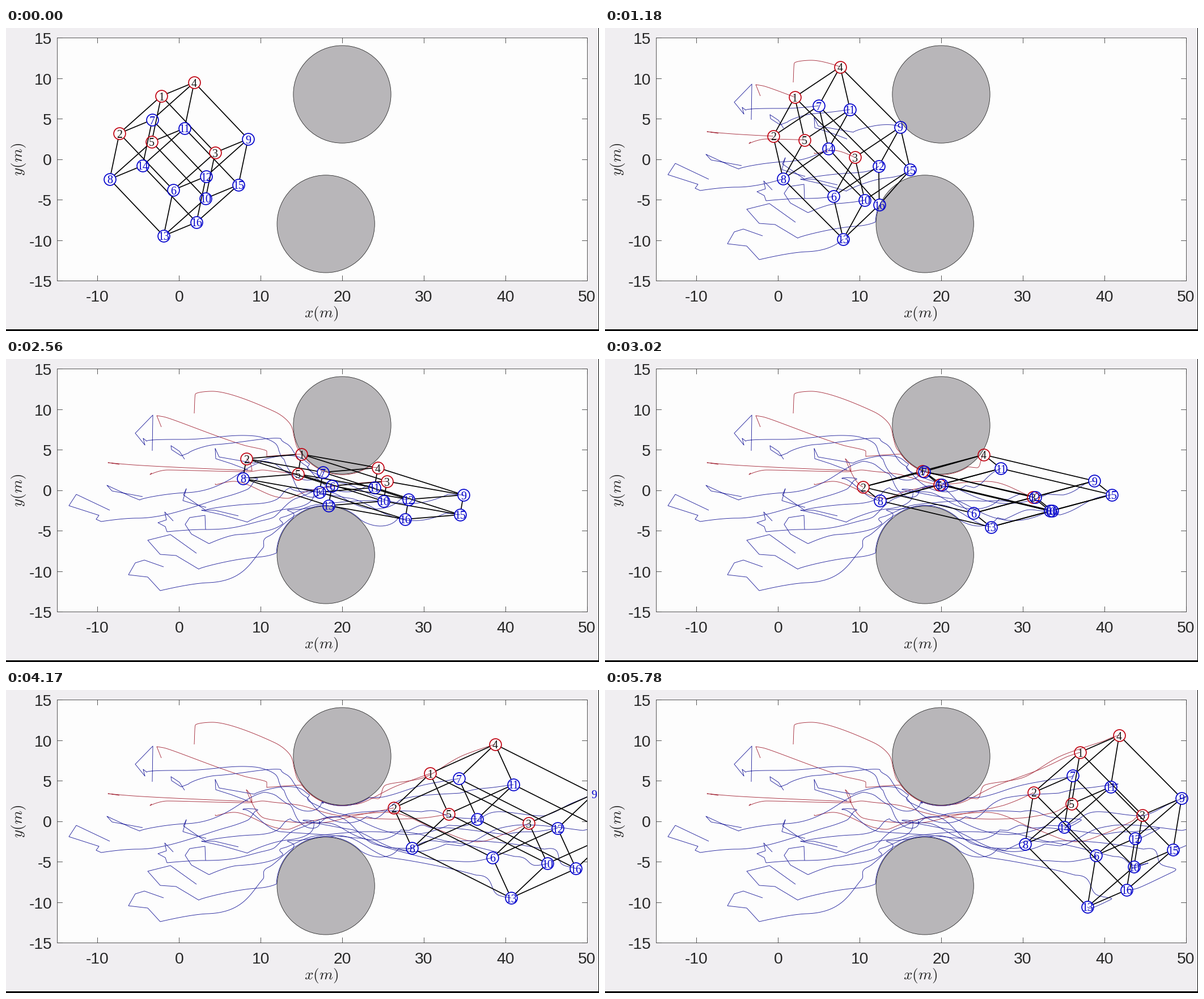
Write a matplotlib script that moves like this. It is 1046x535 px and loops after 5.95 s.

```python
from itertools import combinations

import matplotlib.pyplot as plt
import numpy as np
from matplotlib.animation import FuncAnimation
from matplotlib.collections import LineCollection
from matplotlib.patches import Circle, Rectangle

W, H, DPI = 1046, 535, 100
PT = 72 / DPI                      # points per pixel
LEFT, RIGHT, TOP, BOTTOM = 89.5, 1024.5, 17, 446
TICK_MS, LOOP_MS, FIRST_MS, STEP_MS = 25, 5950, 30, 230
LAST, SUB = 26, 20                 # picture steps, path samples per step
LOCK = 2                           # step at which followers join the formation
RADIUS, CLEARANCE = 10.4, 87.2
RED, BLUE = "#c0000f", "#0000cc"
RED_TRAIL, BLUE_TRAIL = "#a52a3a", "#22229c"

# Way points of the five leaders at shared steps
STEPS = np.array([0, 2, 4, 8, 9, 10, 12, 14, 16, 18, 19.5, 22, 26])
LEADERS = [
    [(274, 120), (266, 100), (278, 102), (419, 152), (460, 163), (460, 172),
     (521, 168), (560, 197), (613, 202), (690, 169), (770, 139), (817, 117),
     (838, 110)],
    [(200, 186), (180, 183), (225, 187), (384, 195), (434, 197), (432, 187),
     (424, 176), (455, 226), (545, 235), (625, 220), (705, 203), (744, 187),
     (756, 181)],
    [(369, 220), (370, 222), (402, 216), (480, 244), (497, 246), (540, 231),
     (672, 216), (755, 244), (830, 268), (885, 252), (932, 230), (936, 226),
     (948, 221)],
    [(332, 96), (334, 62), (364, 57), (474, 93), (502, 116), (517, 161),
     (656, 192), (668, 169), (733, 156), (805, 116), (880, 90), (896, 83),
     (907, 80)],
    [(257, 201), (254, 204), (285, 196), (427, 199), (452, 196), (470, 198),
     (515, 203), (590, 222), (681, 228), (735, 226), (795, 215), (811, 206),
     (823, 201)],
]

# Followers wander through these points before they lock on
WANDER = [
    [(280, 270), (283, 284), (268, 289), (281, 296)],
    [(259, 99), (228, 131), (245, 152), (242, 140)],
    [(124, 239), (111, 259), (164, 276), (159, 283)],
    [(398, 185), (370, 176), (369, 158), (376, 173)],
    [(351, 276), (324, 280), (316, 292), (327, 309)],
    [(306, 163), (291, 153), (292, 160), (309, 171)],
    [(335, 257), (312, 250), (318, 229), (313, 240)],
    [(244, 355), (228, 360), (216, 381), (250, 385)],
    [(187, 233), (178, 223), (221, 243)],
    [(368, 267), (345, 267), (381, 275)],
    [(290, 310), (250, 320), (272, 345), (300, 347)],
]


def px(x):
    return LEFT + (x + 15) * (RIGHT - LEFT) / 65


def py(y):
    return TOP + (15 - y) * (BOTTOM - TOP) / 30


OBSTACLES = [(px(20), py(8)), (px(18), py(-8))]


def smooth(t, k, v):
    """Monotone cubic through the points (k, v)."""
    h = np.diff(k)[:, None]
    d = np.diff(v, axis=0) / h
    m = np.vstack([d[:1], np.zeros_like(d[1:]), d[-1:]])
    prod, total = d[:-1] * d[1:], d[:-1] + d[1:]
    m[1:-1] = np.where(prod > 0, 2 * prod / np.where(prod > 0, total, 1), 0)
    i = np.clip(np.searchsorted(k, t, "right") - 1, 0, len(h) - 1)
    u = (t - k[i])[:, None] / h[i]
    return (v[i] * (1 + 2 * u) * (1 - u) ** 2 + v[i + 1] * u * u * (3 - 2 * u)
            + h[i] * u * (1 - u) * (m[i] * (1 - u) - m[i + 1] * u))


def keep_out(path):
    """Slide a path around the obstacles it would cut through."""
    for centre in OBSTACLES:
        off = path - centre
        dist = np.maximum(np.hypot(*off.T), 1)[:, None]
        path = centre + off * np.maximum(1, CLEARANCE / dist)
    return path


def build_paths(groups):
    t = np.arange(LAST * SUB + 1) / SUB
    lead = [keep_out(smooth(t, STEPS, np.array(p, float))) for p in LEADERS]
    paths = [keep_out(sum((lead[g] for g in group),
                          (1 - len(group)) * lead[0])) for group in groups]
    early = t < LOCK
    for path, points in zip(paths[5:], WANDER):
        points = np.vstack([path[0], points, path[LOCK * SUB]])
        k = np.linspace(0, LOCK, len(points))
        for c in (0, 1):
            path[early, c] = np.interp(t[early], k, points[:, c])
    return np.array(paths)


# The formation is a projected hypercube spanned by leaders 2 to 5
groups = [g for n in range(5) for g in combinations(range(1, 5), n)]
edges = np.array([(i, j) for i, a in enumerate(groups)
                  for j, b in enumerate(groups)
                  if len(b) == len(a) + 1 and set(a) < set(b)])
paths = build_paths(groups)
is_lead = np.arange(len(groups)) < 5

fig = plt.figure(figsize=(W / DPI, H / DPI), dpi=DPI, facecolor="#f0eef1")
ax = fig.add_axes([0, 0, 1, 1])
ax.set(xlim=(0, W), ylim=(H, 0))
ax.axis("off")

box = ax.add_patch(Rectangle((LEFT, TOP), RIGHT - LEFT, BOTTOM - TOP,
                             fc="#fdfdfd", ec="none", zorder=0))
ax.add_patch(Rectangle((0, 531.5), W, 4, fc="black", ec="none"))
ax.add_patch(Rectangle((W - 1, 0), 1, H, fc="black", ec="none"))
for centre in OBSTACLES:
    ax.add_patch(Circle(centre, 86.1, fc="#b8b6b9", ec="#222222",
                        lw=.8 * PT, zorder=1))


def rule(x, y):
    ax.plot(x, y, color="#444444", lw=.9 * PT, zorder=1.5)


def tick_label(x, y, value, ha):
    ax.text(x, y, str(value), family="Liberation Sans", size=28.3 * PT,
            color="#262626", ha=ha, va="center_baseline")


rule([LEFT, RIGHT, RIGHT, LEFT, LEFT], [TOP, TOP, BOTTOM, BOTTOM, TOP])
for v in range(-10, 51, 10):
    x = px(v)
    rule([x, x], [BOTTOM, BOTTOM - 9])
    rule([x, x], [TOP, TOP + 9])
    tick_label(x, 473, v, "center")
for v in range(-15, 16, 5):
    y = py(v)
    rule([LEFT, LEFT + 9], [y, y])
    rule([RIGHT, RIGHT - 9], [y, y])
    tick_label(81, y + 1, v, "right")
for x, y, name, turn in ((556.5, 505, "x", 0), (23, 231.5, "y", 90)):
    ax.text(x, y, f"${name}(m)$", size=27.4 * PT, math_fontfamily="cm",
            color="#262626", ha="center", va="center", rotation=turn)

trails = LineCollection([], lw=.9 * PT, zorder=2,
                        colors=np.where(is_lead, RED_TRAIL, BLUE_TRAIL))
links = LineCollection([], lw=1.7 * PT, colors="black", zorder=3)
for lines in (trails, links):
    ax.add_collection(lines, autolim=False)
    lines.set_clip_path(box)
rings = [ax.plot([], [], "o", ms=2 * RADIUS * PT, mfc="none", mec=color,
                 mew=1.7 * PT, zorder=4)[0] for color in (RED, BLUE)]
labels = [ax.text(0, 0, str(i + 1), family="Liberation Serif", size=20 * PT,
                  color="#111111" if is_lead[i] else BLUE, ha="center",
                  va="center_baseline", zorder=5)
          for i in range(len(groups))]


def update(frame):
    step = (frame * TICK_MS + 20 - FIRST_MS) // STEP_MS + 1
    n = min(step, LAST) * SUB
    pos = paths[:, n]
    trails.set_segments(list(paths[:, :n + 1]))

    a, b = pos[edges[:, 0]], pos[edges[:, 1]]
    length = np.hypot(*(b - a).T)[:, None]
    cut = (b - a) * np.minimum(RADIUS / np.maximum(length, 1), .5)
    links.set_segments(np.stack([a + cut, b - cut], axis=1))

    inside = pos[:, 0] <= RIGHT
    for ring, group in zip(rings, (is_lead, ~is_lead)):
        ring.set_data(*pos[group & inside].T)
    for label, (x, y) in zip(labels, pos):
        label.set_position((x, y + .5))
    return [trails, links, *rings, *labels]


anim = FuncAnimation(fig, update, frames=LOOP_MS // TICK_MS, interval=TICK_MS,
                     repeat=True, repeat_delay=0, init_func=lambda: update(0))
plt.show()
```
